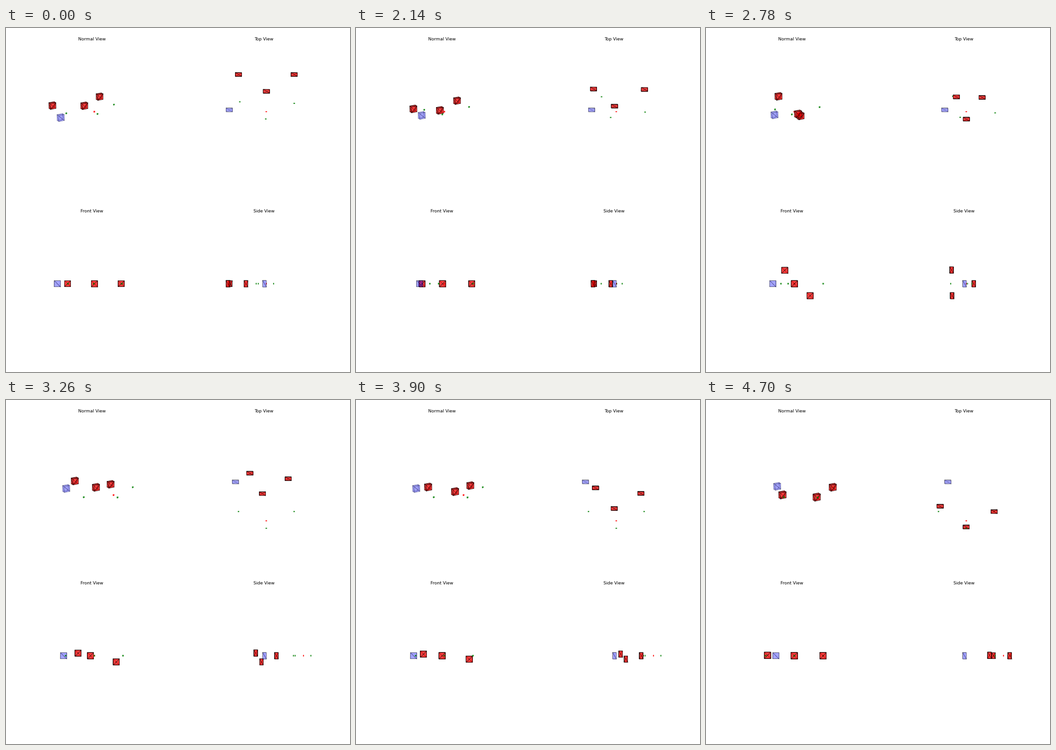
A matplotlib script that plays this animation: 748 by 748 pixels, repeating every 6280 ms.

```python
import numpy as np
import matplotlib.pyplot as plt
from matplotlib.animation import FuncAnimation
from matplotlib.collections import PolyCollection

SIZE, DPI = 748, 64
PANEL = SIZE / 2
TICK, HOLD, STEP, LOOP = 20, 1580, 80, 6280   # ms
STEPS = 40

FOCAL = PANEL / 0.185                  # pixels per unit of projected width
CAMERA = 10.0
SCALE = np.array([6.72, 4.04, 6.72]) * CAMERA / FOCAL
CENTER = np.array([0.095, 0.090]) / 0.185 * PANEL

# title, panel column, panel row, elevation, azimuth
VIEWS = [("Normal View", 0, 0, 20, -120),
         ("Top View", 1, 0, 90, -90),
         ("Front View", 0, 1, 0, -90),
         ("Side View", 1, 1, 0, 180)]

FORMATION = np.array([[-9, 5, 0], [0, -4, 0], [9, 5, 0]], float)


def cube_mesh(flips):
    """Twelve triangles of a cube of side 2; flips picks each face's diagonal."""
    triangles = []
    for axis in range(3):
        u, v = [i for i in range(3) if i != axis]
        for side, flip in zip((-1, 1), flips[axis]):
            quad = np.zeros((4, 3))
            quad[:, axis] = side
            quad[:, u] = [-1, 1, 1, -1]
            quad[:, v] = [-1, -1, 1, 1]
            quad = np.roll(quad, -flip, axis=0)
            triangles += [quad[[0, 1, 2]], quad[[0, 2, 3]]]
    return np.array(triangles)


CROSSED = cube_mesh([(0, 1)] * 3)
SLANTED = cube_mesh([(0, 0), (1, 1), (0, 1)])
DOT = CROSSED * 0.2

# mesh, face colour, edge colour, line width in pixels
DRONE = (CROSSED, (1, 0, 0, 0.5), (0, 0, 0, 0.5), 0.95)
OBSTACLE = (SLANTED, (0, 0, 1, 0.2), (0, 0, 0, 0.2), 0.75)
LEADER = (DOT, (1, 0, 0, 0.5), (1, 0, 0, 0.3), 0.3)
GOAL = (DOT, (0, 0.5, 0, 0.5), (0, 0.5, 0, 0.3), 0.3)


def obstacle_at(k):
    return np.array([-5.5 - 0.5 * abs(k % 26 - 13), 1, 0])


def leader_at(k):
    return np.array([0, 0 if k < STEPS / 2 else -20, 0], float)


def goals_at(k):
    """Formation slots: yawed as the obstacle nears, rolled upright when close."""
    if k >= STEPS / 2:
        return leader_at(k) + FORMATION
    gap = abs(k - 12.4)
    if gap < 3:
        turn = np.array([[0, 0, 1], [0, 1, 0], [-1, 0, 0]])
    else:
        s = 0.681 - 0.0513 * gap
        c = 1 - 0.48 * s
        turn = np.array([[c, s, 0], [-s, c, 0], [0, 0, 1]])
    return leader_at(k) + FORMATION @ turn.T


def fly(drones, goals):
    """Move every drone at most one unit towards its goal."""
    way = goals - drones
    length = np.linalg.norm(way, axis=1, keepdims=True)
    return drones + way / np.maximum(length, 1)


def camera_axes(elev, azim):
    e, a = np.radians([elev, azim])
    right = [-np.sin(a), np.cos(a), 0]
    up = [-np.sin(e) * np.cos(a), -np.sin(e) * np.sin(a), np.cos(e)]
    toward = [np.cos(e) * np.cos(a), np.cos(e) * np.sin(a), np.sin(e)]
    return np.array([right, up, toward])


def project(things, view):
    """Triangles of one view in painter's order with their styles."""
    _, col, row, elev, azim = view
    axes = camera_axes(elev, azim)
    origin = np.array([col * PANEL + CENTER[0], (row + 1) * PANEL - CENTER[0]])
    shapes = []
    things = sorted(things, key=lambda thing: axes[2] @ (thing[0] * SCALE))
    for position, (mesh, face, edge, width) in things:
        seen = ((mesh + position) * SCALE) @ axes.T
        seen = seen[np.argsort(seen[:, :, 2].mean(axis=1), kind="stable")]
        flat = FOCAL * seen[:, :, :2] / (CAMERA - seen[:, :, 2:])
        shapes += [(tri, face, edge, width) for tri in origin + flat * [1, -1]]
    return shapes


def build_scenes():
    scenes = []
    drones = FORMATION + [0, 15, 0]
    for k in range(STEPS + 1):
        goals = goals_at(k)
        things = [(leader_at(k), LEADER), (obstacle_at(k), OBSTACLE)]
        things += [(p, GOAL) for p in goals] + [(p, DRONE) for p in drones]
        shapes = [s for view in VIEWS for s in project(things, view)]
        scenes.append(list(zip(*shapes)))
        drones = fly(drones, goals)
    return scenes


scenes = build_scenes()
to_points = 72 / DPI

fig = plt.figure(figsize=(SIZE / DPI, SIZE / DPI), dpi=DPI, facecolor="white")
ax = fig.add_axes([0, 0, 1, 1])
ax.set(xlim=(0, SIZE), ylim=(SIZE, 0))
ax.axis("off")
for title, col, row, *_ in VIEWS:
    ax.text((col + 0.5) * PANEL, row * PANEL + 27.2, title, ha="center",
            va="baseline", family="DejaVu Sans", size=9.45 * to_points)
cubes = PolyCollection([], joinstyle="round")
ax.add_collection(cubes, autolim=False)


def update(frame):
    time = frame * TICK
    k = 0 if time < HOLD else min(STEPS, 1 + (time - HOLD) // STEP)
    triangles, faces, edges, widths = scenes[k]
    cubes.set_verts(triangles)
    cubes.set_facecolor(faces)
    cubes.set_edgecolor(edges)
    cubes.set_linewidth(np.array(widths) * to_points)
    return [cubes]


anim = FuncAnimation(fig, update, frames=LOOP // TICK, interval=TICK,
                     repeat=True, repeat_delay=0, blit=False)
plt.show()
```
